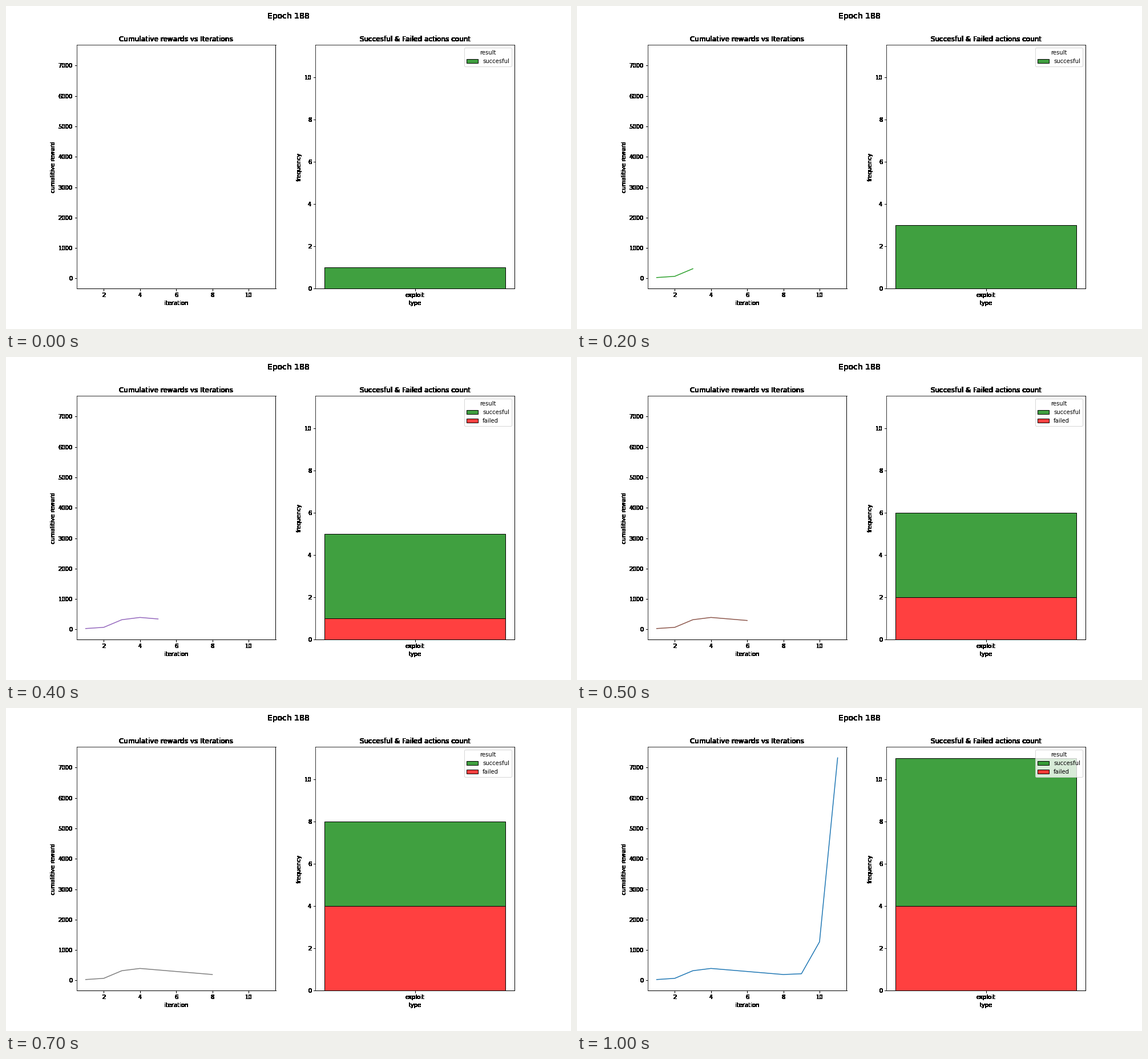
A matplotlib script that plays this animation: 990 px wide and 566 px high, repeating every 1100 ms.

```python
import numpy as np
import matplotlib.pyplot as plt
from matplotlib.animation import FuncAnimation
from matplotlib.patches import Patch, Rectangle

W, H, DPI = 990, 566, 72
STEPS, INTERVAL = 11, 100

REWARDS = np.cumsum([30, 40, 250, 75, -50, -50, -50, -50, 25, 1050, 6050])
FAILED = np.cumsum(np.diff(REWARDS, prepend=0) < 0)
GREEN, RED = (0, 0.5, 0, 0.75), (1, 0, 0, 0.75)

plt.rcParams.update({"font.family": "DejaVu Sans", "font.size": 10,
                     "axes.titlesize": 12})


def solid(img, dpi):
    """Harden soft edges to full black."""
    out = np.zeros_like(img)
    out[..., 3] = img[..., 3] > 0
    return out, 0, 0


def harden(*artists):
    for artist in artists:
        artist.set_agg_filter(solid)


def setup(ax, title, xlabel, ylabel):
    ax.set_title(title)
    ax.set_xlabel(xlabel)
    ax.set_ylabel(ylabel)
    harden(ax.title, ax.xaxis, ax.yaxis, ax.spines["right"], ax.spines["bottom"])


def bar(ax, color):
    return ax.add_patch(Rectangle((-0.5, 0), 1, 0, fc=color, ec="black", lw=1))


fig, (left, right) = plt.subplots(
    1, 2, figsize=(W / DPI, (H + 1e-6) / DPI), dpi=DPI, facecolor="white")
fig.subplots_adjust(left=0.125, right=0.9, bottom=0.125, top=0.88, wspace=0.2)
harden(fig.suptitle("Epoch 188", fontsize=14))

setup(left, "Cumulative rewards vs Iterations", "iteration", "cumalitive reward")
pad = 0.05 * np.ptp(REWARDS)
left.set_xlim(0.5, STEPS + 0.5)
left.set_ylim(REWARDS.min() - pad, REWARDS.max() + pad)
left.set_xticks(range(2, 11, 2))
left.set_yticks(range(0, 7001, 1000))
line, = left.plot([], [], lw=1.5)

setup(right, "Succesful & Failed actions count", "type", "frequency")
right.set_xlim(-0.55, 0.55)
right.set_ylim(0, STEPS * 1.05)
right.set_xticks([0], ["exploit"])
right.set_yticks(range(0, 11, 2))
won_bar, lost_bar = bar(right, GREEN), bar(right, RED)


def update(i):
    n, lost = i + 1, FAILED[i]
    line.set_data(np.arange(1, n + 1), REWARDS[:n])
    line.set_color(f"C{i % 10}")
    line.set_visible(n > 1)

    lost_bar.set_height(lost)
    lost_bar.set_visible(lost > 0)
    won_bar.set_y(lost)
    won_bar.set_height(n - lost)

    keys = [Patch(fc=GREEN, ec="black", label="succesful")]
    if lost:
        keys.append(Patch(fc=RED, ec="black", label="failed"))
    right.legend(handles=keys, title="result", loc="upper right")


anim = FuncAnimation(fig, update, frames=STEPS, interval=INTERVAL,
                     init_func=lambda: update(0), repeat=True, repeat_delay=0)
plt.show()
```
